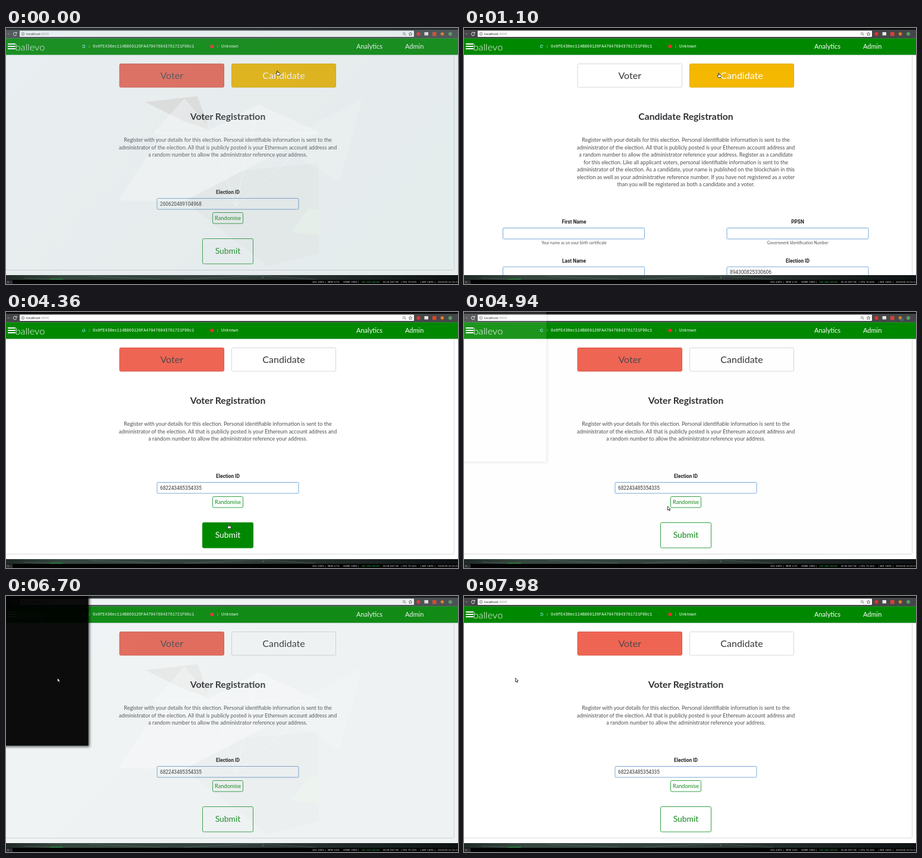
An HTML page for the animation above (8 s loop, 760 px wide and 432 px high).

```html
<!DOCTYPE html>
<html lang="en">
<head>
<meta charset="utf-8">
<title>Registration</title>
<style>
  html, body { margin: 0; width: 100%; height: 100%; overflow: hidden; background: #000; }
  svg { display: block; width: 760px; height: 432px; }
  text { font-family: Lato, sans-serif; white-space: pre; }
  .mid { text-anchor: middle; }
  .mono { font-family: "Liberation Mono", monospace; font-size: 6.75px; fill: #fff; }
  .form { font-family: Roboto, sans-serif; font-size: 8.3px; fill: #333; }
  .label { font-weight: 700; fill: #222; text-anchor: middle; }
  .title { font-size: 15.7px; font-weight: 700; fill: #303234; text-anchor: middle; }
  .body { font-size: 9px; fill: #4c4f52; text-anchor: middle; }
  .hint { font-size: 6.7px; fill: #555; text-anchor: middle; }
  .nav { font-size: 11px; fill: #fff; }
  .status { font-family: "DejaVu Sans", sans-serif; font-size: 3.9px; fill: #ddd; }
  .field { fill: #fff; stroke: #78a9d6; }
  #popup { filter: drop-shadow(2px 2px 2px rgba(0, 0, 0, .65)); }
</style>
</head>
<body>
<svg id="stage" viewBox="0 0 760 432"></svg>
<script>
const LOOP = 8000;
const GREEN = '#008800';

// Markup helpers
const text = (x, y, cls, value, extra = '') =>
  `<text x="${x}" y="${y}" class="${cls}" ${extra}>${value}</text>`;
const rect = (x, y, w, h, fill, extra = '') =>
  `<rect x="${x}" y="${y}" width="${w}" height="${h}" fill="${fill}" ${extra}/>`;
const poly = (points, fill, opacity) =>
  `<polygon points="${points}" fill="${fill}" opacity="${opacity}"/>`;
const dot = (x, y, r, fill) => `<circle cx="${x}" cy="${y}" r="${r}" fill="${fill}"/>`;
const field = (x, y) => `<rect x="${x}" y="${y}" width="238" height="18.5" rx="1.5" class="field"/>`;
const lines = rows => rows.map((row, i) => text(373, 192 + i * 12.5, 'body', row)).join('');

const buttons = {
  voter: { x: 191, y: 60.5, w: 175.5, h: 39.5, label: 'Voter', size: 16, base: 86 },
  candidate: { x: 379.5, y: 60.5, w: 175, h: 39.5, label: 'Candidate', size: 16, base: 86 },
  randomise: { x: 347.5, y: 311.5, w: 51, h: 18.5, label: 'Randomise', size: 9.1, base: 323.7 },
  submit: { x: 330.5, y: 355.5, w: 85, h: 42.5, label: 'Submit', size: 13.9, base: 381 }
};
const button = id => {
  const b = buttons[id];
  return `<g id="${id}">${rect(b.x, b.y, b.w, b.h, '#fff', 'rx="2"')}` +
    text(b.x + b.w / 2, b.base, 'mid', b.label, `font-size="${b.size}"`) + '</g>';
};

const intro = [
  'Register with your details for this election. Personal identifiable information is sent to the',
  'administrator of the election. All that is publicly posted is your Ethereum account address and'
];
const voterText = [...intro, 'a random number to allow the administrator reference your address.'];
const candidateText = [...intro,
  'a random number to allow the administrator reference your address. Register as a candidate',
  'for this election. Like all applicant voters, personal identifiable information is sent to the',
  'administrator of the election. As a candidate, your name is published on the blockchain in this',
  'election as well as your administrative reference number. If you have not registered as a voter',
  'than you will be registered as both a candidate and a voter.'
];

const wallpaper = `
  ${rect(0, 0, 760, 418, 'url(#sky)')}
  ${poly('234,125 322,115 342,172 298,157', '#222', .6)}
  ${poly('250,176 300,120 345,172 425,130 526,177 400,240', '#dce8ea', .35)}
  ${poly('188,291 262,180 400,240 300,292', '#d5dcde', .4)}
  ${poly('300,292 400,240 526,228 526,380 440,402', '#59676a', .45)}
  ${poly('455,195 600,120 560,260', '#b9cdd0', .25)}
  ${poly('508,305 526,305 526,350 480,345', '#93e090', .4)}
  <path d="M250 176L300 120 345 172 425 130 526 177H250L386 300 526 177M345 172L386 300 425 130"
    fill="none" stroke="#fff" stroke-width=".6" opacity=".7"/>`;

const browser = `
  ${rect(0, 0, 760, 3.5, '#0b0c0e')}
  ${rect(0, 3, 760, 14.5, '#454648')}
  ${rect(23, 4.5, 663, 10.5, '#fff', 'rx="1"')}
  <path d="M1 10H6M4 8L6 10 4 12" fill="none" stroke="#777" stroke-width=".8"/>
  <path d="M17.4 8.4A2.8 2.8 0 1 0 17.8 11M18 6.8V9H15.8" fill="none" stroke="#fff" stroke-width=".9"/>
  <circle cx="28.5" cy="10" r="2.4" fill="none" stroke="#555" stroke-width=".7"/>
  <path d="M28.5 9.6V11.4M28.5 8.4V9" stroke="#555" stroke-width=".7"/>
  ${text(34, 12, 'form', 'localhost<tspan fill="#999">:3000</tspan>', 'style="font-size:5.8px"')}
  <circle cx="669.3" cy="9.5" r="1.9" fill="none" stroke="#555" stroke-width=".7"/>
  <path d="M670.7 11L672.3 12.6" stroke="#555"/>
  <path d="M680 7L680.9 9 683 9.2 681.4 10.6 682 12.7 680 11.5 678 12.7 678.6 10.6 677 9.2 679.1 9Z"
    fill="none" stroke="#444" stroke-width=".7"/>
  ${dot(693.5, 10, 3.2, '#d8352b')}${rect(703.5, 7, 6.5, 5.5, '#e8e8e8')}
  ${rect(717, 7, 6.5, 6.5, '#d8432f')}${dot(733.5, 10, 2.8, '#e87a1e')}${dot(747, 10, 3.1, '#579b62')}
  ${rect(734, 11, 5, 4, '#2b6c88', 'id="badge"')}
  ${rect(0, 17.5, 760, 28, GREEN)}
  ${[26, 30, 34].map(y => rect(3, y, 13, 2, '#fff')).join('')}
  ${text(15.5, 37.5, 'nav', 'ballevo', 'style="font-size:16.4px;font-weight:300"')}
  <g id="spinner" fill="none" stroke="#6fe0c0" stroke-width="1.1">
    <circle cx="130.5" cy="31" r="2.1" stroke-dasharray="5.2 1.4"/></g>
  ${text(138, 33.2, 'mono', ': 0x0fE430ec114B869126FA470476943761721F99c1')}
  <path d="M343 31L345 28.3H348L350 31 349 33.7H344Z" fill="#e33030"/>
  ${text(354, 33.2, 'mono', ': Unknown')}
  ${text(589, 35, 'nav', 'Analytics')}${text(671, 35, 'nav', 'Admin')}
  ${rect(0, 45.5, 760, 372, '#fff')}
  <path id="card" fill="none" stroke="#d9dcdd"/>
  ${button('voter')}${button('candidate')}
  <g id="voterPage">
    ${text(373, 155, 'title', 'Voter Registration')}
    ${lines(voterText)}
    ${text(373, 280, 'form label', 'Election ID')}
    ${field(254, 287.5)}
    ${text(259, 300, 'form', '', 'id="electionId"')}
    ${button('randomise')}${button('submit')}
  </g>
  <g id="candidatePage">
    ${text(373, 155, 'title', 'Candidate Registration')}
    ${lines(candidateText)}
    ${text(185, 330, 'form label', 'First Name')}${text(561, 330, 'form label', 'PPSN')}
    ${field(65.5, 337.5)}${field(442, 337.5)}
    ${text(185, 365, 'hint', 'Your name as on your birth certificate')}
    ${text(561, 365, 'hint', 'Government Identification Number')}
    ${text(185, 395.5, 'form label', 'Last Name')}${text(561, 395.5, 'form label', 'Election ID')}
    ${field(65.5, 403)}${field(442, 403)}
    ${text(447, 415.3, 'form', '894300825330606')}
  </g>`;

const statusBar = `
  ${rect(0, 417, 760, 8, 'url(#strip)')}
  <path d="M30 422L75 424H96M140 419L260 424M300 424L420 418 520 424" fill="none" stroke="#82a08f" stroke-width=".5" opacity=".5"/>
  ${rect(74, 423.3, 22, 1.2, '#238a35')}${dot(432, 421, 1, '#4d8a5c')}
  ${rect(0, 425, 760, 7, '#030303')}${rect(0, 425.5, 11, 6.5, '#2b2f31')}
  ${text(2, 430, 'status', '1:')}
  ${text(515, 430, 'status', 'VOL 100% |')}${text(541, 430, 'status', '', 'id="mem"')}
  ${text(567, 430, 'status', 'HOME 199G |')}
  ${text(597, 430, 'status', '192.168.100.60', 'style="fill:#29b54a"')}
  ${text(634, 430, 'status', '', 'id="net"')}${text(664, 430, 'status', '', 'id="cpu"')}
  ${text(697, 430, 'status', '| BAT 100% |')}${text(726, 430, 'status', '2018-05-10 22:27')}`;

const stage = document.getElementById('stage');
stage.innerHTML = `
  <defs>
    <linearGradient id="sky" x2="1" y2=".5">
      <stop stop-color="#8fb0bd"/><stop offset=".5" stop-color="#8ba4aa"/><stop offset="1" stop-color="#7fa0a4"/>
    </linearGradient>
    <linearGradient id="strip">
      <stop stop-color="#202927"/><stop offset=".12" stop-color="#35483f"/>
      <stop offset=".5" stop-color="#34403d"/><stop offset="1" stop-color="#0d1213"/>
    </linearGradient>
    <clipPath id="pane">${rect(0, 0, 760, 417, '#fff')}</clipPath>
  </defs>
  ${wallpaper}
  <g id="window" clip-path="url(#pane)">${browser}</g>
  ${statusBar}
  <rect id="popup" x="-5" y="-5" width="143.5" height="257.5"/>
  <g id="cursor" stroke="#111" stroke-width=".8" stroke-linejoin="round" fill="#fff">
    <path id="arrow" d="M.4 .4V7L2 5.6 3.2 8 4.3 7.5 3.2 5.2H5.2Z"/>
    <path id="hand" d="M-.6 .6Q.2 -.4 .9 .6V3L4 3.6Q4.8 4 4.6 5L4 7.6H-.2L-2.4 4.8Q-2 3.6 -.6 4.6Z"/>
  </g>`;

const el = Object.fromEntries([...stage.querySelectorAll('[id]')].map(n => [n.id, n]));

// Timelines: [time, ...values]
const cursorKeys = [
  [0, 456, 72], [300, 456, 72], [650, 446, 74], [1100, 428, 76], [1250, 428, 76],
  [1600, 300, 82], [2150, 296, 84], [2580, 386, 187], [2980, 374, 318], [4220, 374, 318],
  [4340, 374, 358], [4860, 374, 358], [5200, 240, 230], [5640, 107, 131], [5820, 107, 131],
  [6300, 86, 138]
];
const windowKeys = [
  [0, .8], [700, 1], [4900, 1], [5500, .92], [5820, .92], [6300, .8], [6550, .8], [7000, 1]
];
// opacity, brightness
const popupKeys = [
  [4900, 0, 255], [5250, .98, 255], [6560, .98, 255], [6700, .95, 0], [7160, .85, 0], [7640, 0, 0]
];
const idSteps = [[0, '260620489104968'], [1800, '966794936768208'], [3940, '682243485354335']];
const statusSteps = [
  [0, '4.7', 1, '70.53'], [2000, '4.7', 3, '70.54'], [3600, '4.7', 0, '70.14'],
  [5000, '4.7', 3, '70.13'], [6500, '4.0', 0, '70.13'], [7600, '4.0', 0, '70.19']
];

function tween(keys, t) {
  const next = keys.findIndex(k => k[0] > t);
  if (next === 0) return keys[0].slice(1);
  if (next < 0) return keys.at(-1).slice(1);
  const a = keys[next - 1], b = keys[next];
  const p = (t - a[0]) / (b[0] - a[0]);
  return a.slice(1).map((v, i) => v + (b[i + 1] - v) * p);
}
const step = (steps, t) => steps.findLast(s => s[0] <= t).slice(1);
const show = (node, on) => node.setAttribute('display', on ? 'inline' : 'none');

function paint(id, fill, stroke, ink) {
  const [box, label] = el[id].children;
  box.setAttribute('fill', fill);
  box.setAttribute('stroke', stroke);
  label.setAttribute('fill', ink);
}

function draw(t) {
  const [x, y] = tween(cursorKeys, t);
  const candidate = t >= 700 && t < 1800;
  const over = id => {
    const b = buttons[id];
    return x >= b.x && x <= b.x + b.w && y >= b.y && y <= b.y + b.h;
  };

  show(el.candidatePage, candidate);
  show(el.voterPage, !candidate);
  el.card.setAttribute('d', candidate ? 'M753.5 46V417' : 'M753.5 46V406Q753.5 408.5 751 408.5H0');

  if (!candidate || over('voter')) paint('voter', '#ef6553', '#d95b4b', '#51494a');
  else paint('voter', '#fff', '#d5d7d9', '#343638');
  if (candidate || over('candidate')) paint('candidate', '#f4b800', '#e0aa08', '#fff');
  else paint('candidate', '#fff', '#d5d7d9', '#343638');
  for (const id of ['randomise', 'submit']) {
    const hot = !candidate && over(id);
    paint(id, hot ? GREEN : '#fff', hot ? GREEN : '#35a046', hot ? '#fff' : '#138a1c');
  }

  el.electionId.textContent = step(idSteps, t)[0];
  el.window.setAttribute('opacity', tween(windowKeys, t)[0]);
  el.spinner.setAttribute('transform', `rotate(${t * .18} 130.5 31)`);
  show(el.badge, t >= 4900 && t < 6600);

  const [opacity, level] = tween(popupKeys, t);
  el.popup.setAttribute('opacity', opacity);
  el.popup.setAttribute('fill', `rgb(${level},${level},${level})`);

  const [mem, net, cpu] = step(statusSteps, t);
  el.mem.textContent = `MEM ${mem}G`;
  el.net.textContent = `IN ${net}K OUT 0K`;
  el.cpu.textContent = `| CPU ${cpu}%`;

  const pointing = Object.keys(buttons).some(id =>
    over(id) && (!candidate || id === 'voter' || id === 'candidate'));
  show(el.hand, pointing);
  show(el.arrow, !pointing);
  el.cursor.setAttribute('transform', `translate(${x} ${y})`);
}

const start = performance.now();
function tick() {
  draw((performance.now() - start) % LOOP);
  requestAnimationFrame(tick);
}
tick();
</script>
</body>
</html>
```
